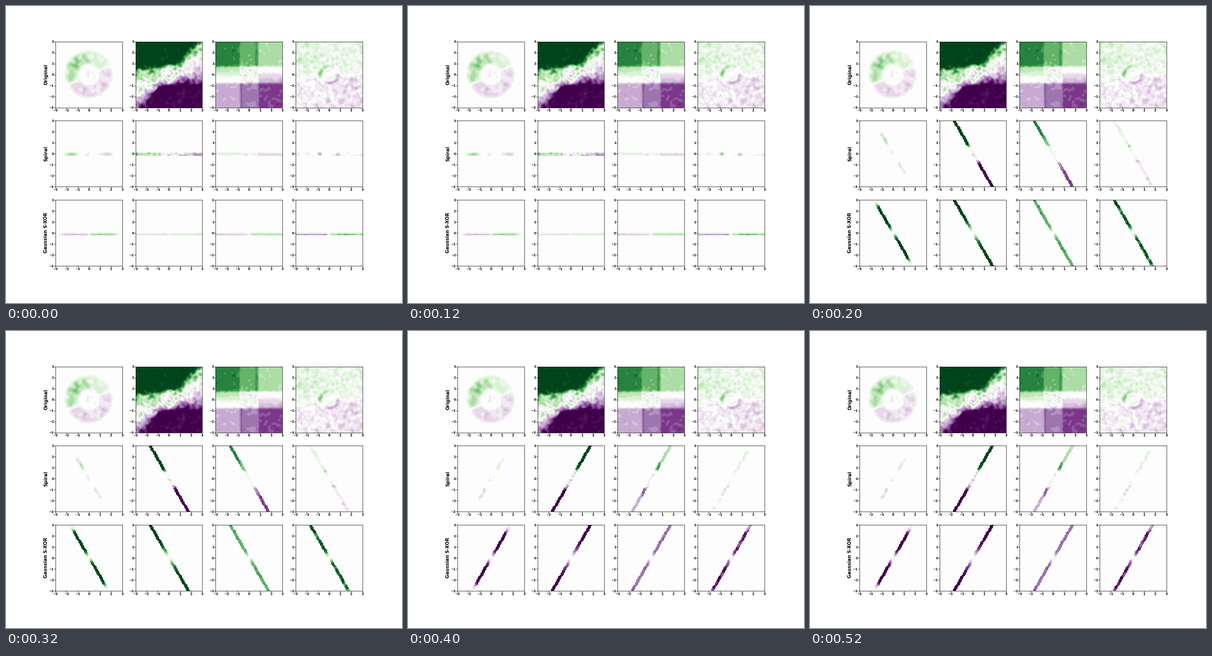
Animation of 864 by 648 pixels, one loop 0.6 s. Source, as a matplotlib script:

```python
import numpy as np
import matplotlib.pyplot as plt
from matplotlib.animation import FuncAnimation
from matplotlib.colors import LinearSegmentedColormap

COLORS = ["#40004b", "#762a83", "#9970ab", "#c2a5cf", "#e7d4e8", "#fdfdfd",
          "#d9f0d3", "#a6dba0", "#5aae61", "#1b7837", "#00441b"]
CMAP = LinearSegmentedColormap.from_list("purple_green", COLORS)
LEVELS = np.linspace(-1.05, 1.05, 22)
ANGLES = np.radians([0, 120, 60])
ROWS = ["Original", "Spiral", "Gaussian S-XOR"]

N = 50
axis = np.linspace(-3, 3, N)
X, Y = np.meshgrid(axis, axis)
R, T = np.hypot(X, Y), np.arctan2(Y, X)
rng = np.random.default_rng(12)


def noise(passes=1):
    """Smoothed unit-variance noise on the grid."""
    z = rng.normal(size=(N, N))
    for _ in range(passes):
        for ax in (0, 1):
            z = (np.roll(z, 1, ax) + 2 * z + np.roll(z, -1, ax)) / 4
    return z / z.std()


def step(v, width):
    return 0.5 * (1 + np.tanh(v / width))


def core(strength):
    """Rippled disc in the middle of a panel."""
    ripple = np.cos(11 * R - T) * 0.6 + 0.6 * noise()
    return strength * ripple * step(0.9 - R, 0.08)


def rings():
    band = np.exp(-((R - 1.55) / 0.55) ** 4)
    turn = np.degrees(T) % 360
    green = step(turn - 25, 8) * step(203 - turn, 6) + step(turn - 385, 8)
    shifted = (turn - 180) % 360
    purple = step(shifted - 30, 8) * step(203 - shifted, 6)
    n = noise(2)
    warm = 1 + 0.5 * np.exp(-((turn - 140) / 30) ** 2)
    z = band * (0.25 * green * warm - 0.22 * purple) * (1 + 0.33 * n)
    return z + 0.05 * noise(2) * (R < 0.75)


def diagonal():
    def edge(x):
        return np.interp(x, [-3, -1, 0, 1, 1.5, 2.3, 3],
                         [1.0, 0.75, 0.9, 1.2, 2.0, 3.0, 3.9])
    mid = 0.4 * X
    up = (Y - mid) / (edge(X) - mid)
    down = (mid - Y) / (edge(-X) + mid)
    z = np.where(Y > mid, up, -down)
    z = np.sign(z) * np.clip(np.abs(z) ** 1.5 * 1.05, 0, 1.12)
    n = noise()
    z = z + n * np.where(np.abs(z) > 1, 0.07, 0.16)
    return z * step(R - 0.82, 0.14) + core(0.27)


def blocks():
    def half(x, y):
        left, right = step(-0.85 - x, 0.05), step(x - 0.82, 0.05)
        mid = 1 - left - right
        top = 0.78 * left + 0.58 * mid + 0.38 * right
        top = top + 0.16 * np.exp(-((x - 0.68) / 0.1) ** 2)
        low = left * np.clip(0.16 + 0.2 * y, 0, 1) * 1.2
        return top * step(y - 0.75, 0.08) + low * step(y + 0.1, 0.15) * step(0.75 - y, 0.08)
    z = half(X, Y) - half(-X, -Y)
    return z + 0.028 * noise() + core(0.15)


def mottled():
    side = np.tanh(2 * (Y - 0.1 * X))
    base = side * (0.085 + 0.08 * np.clip(-X * side / 2, 0, 1))
    z = base + 0.085 * noise()
    ring = np.exp(-((R - 0.78) / 0.16) ** 2)
    inner = np.exp(-((R - 0.4) / 0.1) ** 2)
    z = z * step(R - 0.6, 0.15)
    return z + 0.45 * ring * np.cos(T - 2.5) - 0.15 * inner * np.cos(T - 2)


def xor(amp, soft):
    """Opposite signs in neighbouring quadrants."""
    return -amp * np.tanh(X / 0.15) * np.tanh((Y - 0.03) / soft)


def xor_fields():
    fade = 1 / (1 + np.exp((np.hypot(1.25 * X, Y) - 3.05) / 0.16))
    return [xor(1.15 * fade, 0.48) + 0.02 * noise(),
            xor(1.15, 0.95) + 0.02 * noise(),
            xor(0.64, 0.32) + 0.025 * noise(),
            xor(0.88 + 0.14 * noise(2), 0.32)]


def strip(z, angle):
    """Keep only a narrow band along a line through the centre."""
    d = X * np.sin(angle) - Y * np.cos(angle)
    return np.ma.masked_where((d < -0.13) | (d > 0.19), z)


def paint(ax, z):
    return ax.contourf(X, Y, z, levels=LEVELS, cmap=CMAP, extend="both")


fig, axes = plt.subplots(3, 4, figsize=(12, 9), dpi=72, facecolor="white")
fig.subplots_adjust(left=0.125, right=0.9, bottom=0.125, top=0.88,
                    wspace=0.2, hspace=0.2)
plt.rcParams["font.family"] = "DejaVu Sans"

spirals = [rings(), diagonal(), blocks(), mottled()]
fields = [spirals, xor_fields()]

for ax in axes.flat:
    ax.set_facecolor("#fdfdfd")
    ax.set(xlim=(-3, 3), ylim=(-3, 3), xticks=range(-3, 4), yticks=range(-3, 4))
    ax.tick_params(labelsize=7, pad=0)
    for label in ax.get_xticklabels() + ax.get_yticklabels():
        label.set_fontweight("bold")
for ax, name in zip(axes[:, 0], ROWS):
    ax.set_ylabel(name, fontsize=10, fontweight="bold", labelpad=1.5)

for ax, z in zip(axes[0], spirals):
    paint(ax, z)

slices = [[paint(axes[row + 1, col], strip(fields[row][col], a))
           for row in range(2) for col in range(4)] for a in ANGLES]


def update(i):
    for k, group in enumerate(slices):
        for item in group:
            item.set_visible(k == i)
    return [item for group in slices for item in group]


anim = FuncAnimation(fig, update, frames=len(ANGLES), interval=200,
                     repeat=True, repeat_delay=0, blit=False)
plt.show()
```
